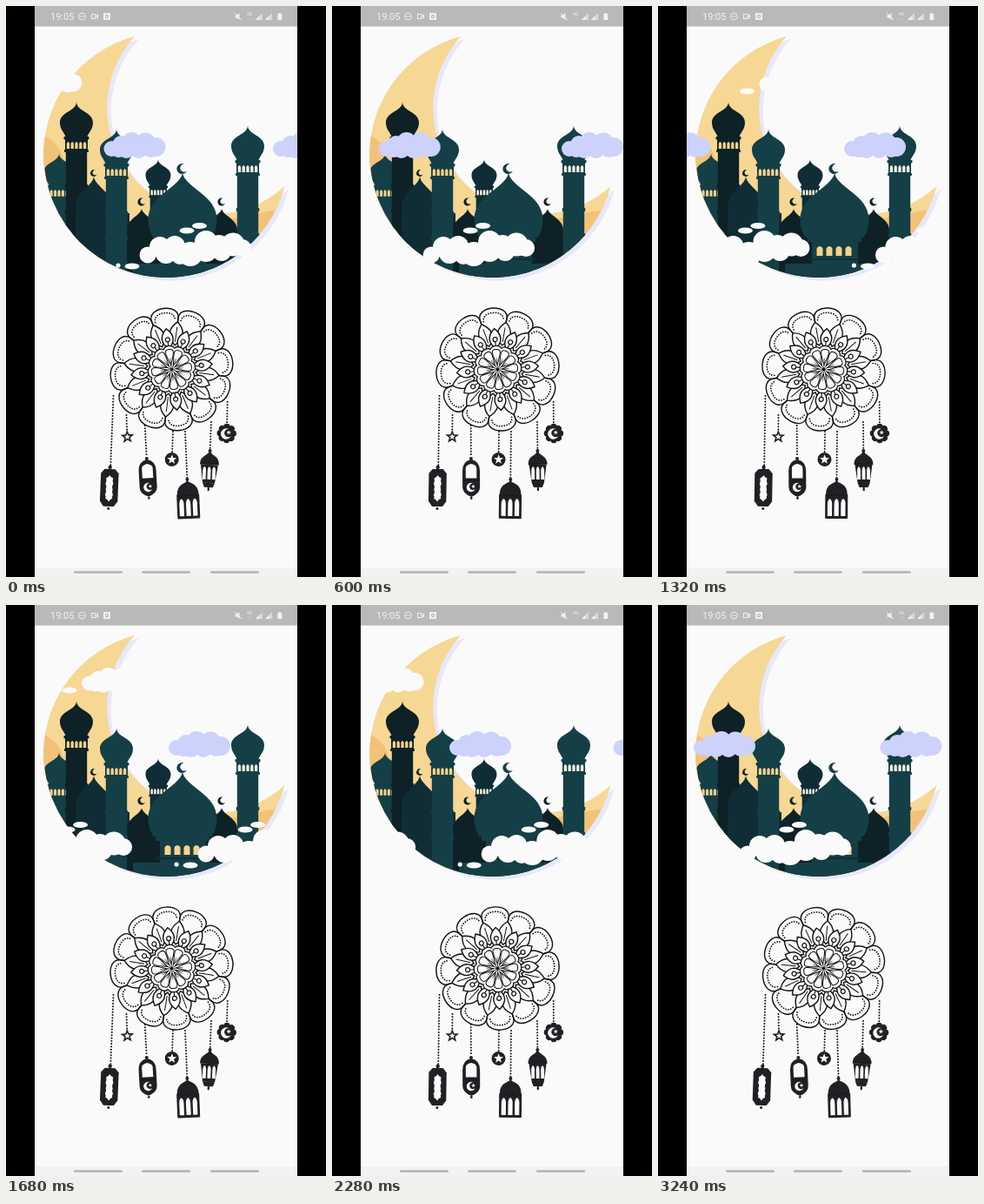
An HTML page that plays this animation: 368x656 px, repeating every 3360 ms.

```html
<!DOCTYPE html>
<html lang="en">
<head>
<meta charset="utf-8">
<title>Crescent and lanterns</title>
<style>
html, body { margin: 0; width: 100%; height: 100%; overflow: hidden; background: #000; }
svg { display: block; width: 368px; height: 656px; }
text { font-family: Roboto, sans-serif; fill: #f1f1f1; }
</style>
</head>
<body>
<svg id="stage" viewBox="0 0 368 656"></svg>
<script>
const BG = '#fafafa', DARK = '#0d2126', NAVY = '#102d36', TEAL = '#153f46', GOLD = '#f7d18b', INK = '#202124';
const MOON = 'M148 34.8A141 141 0 1 0 320.5 207A122 122 0 0 1 148 34.8Z';

const path = (d, fill, extra = '') => `<path d="${d}" fill="${fill}" ${extra}/>`;
const rect = (x, y, w, h, fill, r = 0) => `<rect x="${x}" y="${y}" width="${w}" height="${h}" rx="${r}" fill="${fill}"/>`;
const disc = (x, y, r, fill, ry = r) => `<ellipse cx="${x}" cy="${y}" rx="${r}" ry="${ry}" fill="${fill}"/>`;
const line = (d, width, extra = '', fill = 'none') => path(d, fill, `stroke="#111" stroke-width="${width}" ${extra}`);
const dots = (d, gap, width) => line(d, width, `stroke-linecap="round" stroke-dasharray="0 ${gap}"`);
const around = (n, offset, art) => Array.from({ length: n }, (_, i) =>
  `<g transform="rotate(${(i + offset) * 360 / n})">${art}</g>`).join('');
const arch = (x, y, w, h, fill) =>
  path(`M${x - w / 2} ${y + h}v${-h * .7}q0 ${-h * .22} ${w / 2} ${-h * .3}q${w / 2} ${h * .08} ${w / 2} ${h * .3}v${h * .7}z`, fill);

function crescent(x, y, r, fill) {
  const a = `${x + .4 * r} ${y - .9 * r}`, b = `${x + .9 * r} ${y + .4 * r}`;
  return path(`M${a}A${r} ${r} 0 1 0 ${b}A${.75 * r} ${.75 * r} 0 1 1 ${a}`, fill);
}

function star(x, y, r, fill) {
  const points = Array.from({ length: 10 }, (_, i) => {
    const a = i * Math.PI / 5, q = i % 2 ? r * .42 : r;
    return `${x + q * Math.sin(a)},${y - q * Math.cos(a)}`;
  });
  return `<polygon points="${points.join(' ')}" fill="${fill}"/>`;
}

// Pointed dome: tip at (x, y), half width w, height h
const dome = (x, y, w, h, fill) => path(
  `M${x} ${y}C${x - w * .1} ${y + h * .24} ${x - w} ${y + h * .34} ${x - w} ${y + h * .72}` +
  `Q${x - w} ${y + h * .88} ${x - w * .85} ${y + h}H${x + w * .85}Q${x + w} ${y + h * .88} ${x + w} ${y + h * .72}` +
  `C${x + w} ${y + h * .34} ${x + w * .1} ${y + h * .24} ${x} ${y}`, fill);

function tower(x, y, w, bottom, fill, light) {
  const s = w / 19, h = 41 * s;
  const bar = (half, from, to) => rect(x - half * s, y + from * s, 2 * half * s, (to - from) * s, fill, s);
  let art = path(
    `M${x} ${y}C${x} ${y + h * .27} ${x - w} ${y + h * .28} ${x - w} ${y + h * .58}` +
    `C${x - w} ${y + h * .8} ${x - w * .7} ${y + h * .86} ${x - w * .65} ${y + h}H${x + w * .65}` +
    `C${x + w * .7} ${y + h * .86} ${x + w} ${y + h * .8} ${x + w} ${y + h * .58}` +
    `C${x + w} ${y + h * .28} ${x} ${y + h * .27} ${x} ${y}`, fill);
  art += bar(14.5, 40, 43.5) + bar(13, 42, 58) + bar(14, 55, 58) + bar(13.3, 95, 99) + bar(13.3, 124, 128);
  art += rect(x - 12.2 * s, y + 56 * s, 24.4 * s, bottom - y - 56 * s, fill);
  for (let i = -2; i < 3; i++) art += arch(x + i * 4.8 * s, y + 46 * s, 3.3 * s, 8 * s, light);
  return art;
}

function city() {
  return rect(76, 238, 66, 80, NAVY) + crescent(101, 192, 3.8, DARK) +
    tower(61, 169, 17.5, 320, TEAL, GOLD) + tower(81, 110, 19, 320, DARK, GOLD) +
    rect(80, 240, 40, 80, NAVY) + dome(101, 196, 21, 50, NAVY) +
    tower(175, 176, 14.5, 260, NAVY, '#f3efe0') +
    dome(156, 233, 17, 34, DARK) + rect(138, 258, 60, 60, DARK) + crescent(156, 225, 4.5, DARK) +
    dome(248, 233, 18, 34, DARK) + rect(216, 258, 52, 60, DARK) + crescent(248, 225, 4.5, DARK) +
    tower(127, 141, 19, 320, TEAL, GOLD) + tower(278, 137, 19, 320, TEAL, '#f3efe0') +
    crescent(202.5, 187, 6, TEAL) + dome(203, 192, 39.5, 74, TEAL) +
    rect(172, 266, 62, 5, TEAL, 1) + rect(177, 269, 53, 50, TEAL) +
    [186, 197, 208, 219].map(x => arch(x, 276, 7, 11, GOLD)).join('') +
    rect(146, 296, 116, 20, TEAL) + rect(172, 290, 62, 2, NAVY);
}

function mandala() {
  const bump = 'M-11.1 -41.5L-15.2 -56.500C-18 -66 -9 -70.700 0 -70.700S18 -66 15.2 -56.500L11.1 -41.500';
  return around(12, 0, line(bump, 1.4) + dots('M-11.500 -56C-12 -63 -6 -65.300 0 -65.300S12 -63 11.500 -56', 2.9, 1.8)) +
    around(12, .5, line('M0 -55C-9 -47 -11 -38 0 -28C11 -38 9 -47 0 -55Z', 1.4, '', BG) + line('M0 -32V-49', 1)) +
    around(12, 0, line('M0 -47C-9 -39 -8 -31 0 -24C8 -31 9 -39 0 -47Z', 1.4, '', BG) +
      line('M0 -26V-32', 1.1) + line('M-2.500 -34.500a2.500 2.500 0 1 0 5 0a2.500 2.500 0 1 0 -5 0', 1.2, '', BG)) +
    disc(0, 0, 25, BG) +
    around(12, 0, line('M-6.3 -23.500C-5 -28.500 5 -28.500 6.3 -23.500', 1.3, '', BG)) +
    around(12, 0, line('M0 -5C-1.500 -10 -5 -17 -4.500 -20.500C-4 -24 4 -24 4.500 -20.500C5 -17 1.500 -10 0 -5Z', 1) +
      line('M0 0V-13', .6)) + disc(0, 0, 1.6, '#111');
}

// Each ornament: pivot, swing angle as base + gain * swing, string end, art
const ornaments = [
  { x: 123.5, y: 448, base: 1.2, gain: -1.2, end: 528, art:
    disc(123, 530, 2.2, INK) +
    path('M117 532H129L133.2 537V569L129 575H117L112.8 569V537Z', INK) + disc(123, 577.5, 1.5, INK) +
    path('M123 539q1.5 3 4 3.500q-1 4 .5 6.500q-2 3 -.5 6.500q-1.500 3 .5 6q-1.500 3 -.5 4.500q-2.500 .5 -4 3.500q-1.500 -3 -4 -3.500q1 -1.500 -.5 -4.500q2 -3 .5 -6q1.500 -3.500 -.5 -6.500q1.500 -2.500 .5 -6.500q2.500 -.5 4 -3.500z', BG) },
  { x: 159.7, y: 482, base: -1, gain: 2.4, end: 518, art:
    disc(159.7, 520, 2, INK) + path('M149.700 534Q149.700 523 159.700 521Q169.700 523 169.700 534V553Q169.700 560 159.700 564Q149.700 560 149.700 553Z', INK) +
    arch(159.7, 526, 12.5, 16.5, BG) + dots('M152 545H169', 2.6, 1.4) +
    crescent(159.5, 553, 5.2, BG) + star(162, 552, 2.5, BG) + disc(159.7, 565.5, 1.4, INK) },
  { x: 206, y: 489, base: 0, gain: 2.7, end: 542, art:
    disc(206, 544, 2, INK) + path('M206 545Q207 547 211 548.500Q218.500 552 218.500 562H193.500Q193.500 552 201 548.500Q205 547 206 545Z', INK) +
    rect(193, 561, 26, 28, INK, 1) + dots('M195 562.500H218', 2.6, 1.3) +
    [198.3, 206, 213.7].map(x => arch(x, 566, 5.2, 20, BG)).join('') },
  { x: 236, y: 478, base: 0, gain: -2.6, end: 509, art:
    disc(236, 511, 2, INK) + path('M236 511Q238 515 242 517Q247 520 247 527H225Q225 520 230 517Q234 515 236 511Z', INK) +
    dots('M227 525.500H246', 2.5, 1.2) + path('M226 527H246L243 548H229Z', INK) +
    [230.5, 236, 241.5].map(x => arch(x, 529, 3.8, 15, BG)).join('') +
    path('M229 548H243L241 553H231Z', INK) + disc(236, 555, 1.2, INK, 2.5) },
  { x: 138.5, y: 470, base: 0, gain: 2.5, end: 487, art: star(138.5, 495, 8.3, INK) + star(138.5, 495, 3.8, BG) },
  { x: 254.7, y: 455, base: 0, gain: -1.6, end: 480, art:
    `<g transform="translate(254.7 491)">${around(8, 0, disc(0, -7.5, 3.7, INK))}${disc(0, 0, 8, INK)}</g>` +
    crescent(254.3, 491.5, 6.2, BG) + star(257, 490, 2.8, BG) },
  { x: 192, y: 489, base: 1.1, gain: -1.2, end: 513, art: disc(192, 521, 8, INK) + star(192, 521, 5.8, BG) }
];

const puffs = (list, fill) => list.map(([x, y, r]) => disc(x, y, r, fill)).join('');
const smallCloud = fill => puffs([[9, 19, 9], [20, 14, 10], [32, 11, 11], [48, 12, 11.5], [60, 17, 11],
  [26, 20, 10], [40, 20, 10], [54, 20, 9], [17, 21, 8]], fill);
// x is measured from the centre of the lower floating wisp
const wisp = (x, y) => disc(x, y, 8.5, BG, 3.6);
const whiteGroup = wisp(0, 258) + wisp(14.5, 252.5) + wisp(-63, 299) + wisp(2, 98) + disc(-79, 298, 2.6, BG) +
  puffs([[-45, 286, 9.5], [-31, 277, 12], [-14, 276, 12], [4, 285, 14], [22, 271, 13], [37, 274, 11],
    [53, 274, 13.5], [64, 278, 10], [-24, 284, 12], [-8, 287, 10], [22, 281, 13], [40, 282, 11]], BG) +
  `<g transform="translate(16 72) scale(.95)">${smallCloud(BG)}</g>`;

const pills = [78, 156, 235].map(x => rect(x, 649.3, 56, 2.4, '#b3b3b3', 1.2)).join('');
const statusBar = rect(33, 0, 302, 23.5, '#b9b9b9') +
  `<text x="51" y="16" font-size="11">19:05</text>
   <g fill="none" stroke="#f1f1f1"><circle cx="87.5" cy="12" r="3.9"/><path d="M85.5 12h4"/>
   <rect x="98.5" y="9.5" width="4.5" height="5"/><path d="M103 12l2.5 -2v4z"/></g>` +
  rect(112, 8, 8, 8, '#f1f1f1', 1) + disc(116, 12, 2.2, '#b9b9b9') + disc(116, 12, 1, '#f1f1f1') +
  path('M263.5 10.5h2l3 -2.5v8l-3 -2.5h-2z', '#f1f1f1') +
  `<path d="M263 8l8 8" stroke="#f1f1f1"/><text x="277" y="11" font-size="5">4G</text><text x="278" y="16" font-size="4">↓↑</text>` +
  [287, 298].map(x => path(`M${x} 16l8 -8v8z`, '#d9d9d9') + path(`M${x} 16l4.5 -4.5v4.5z`, '#f1f1f1')).join('') +
  rect(312.3, 9, 5, 7, '#f1f1f1', .8) + rect(313.7, 8, 2.2, 2, '#f1f1f1');

const group = (cls, art, n) => Array.from({ length: n }, () => `<g class="${cls}">${art}</g>`).join('');
const stage = document.getElementById('stage');
stage.innerHTML = `
  <defs>
    <clipPath id="screen"><rect x="33" width="302" height="656"/></clipPath>
    <clipPath id="disc"><circle cx="184.5" cy="171" r="141"/></clipPath>
    <clipPath id="moon"><path d="${MOON}"/></clipPath>
  </defs>
  <g clip-path="url(#screen)">
    ${rect(33, 0, 302, 656, BG)}
    ${path(MOON, '#e7e8fb', 'transform="translate(4.5 3.5)"')}
    ${path(MOON, '#f7d794')}
    <g clip-path="url(#moon)">${path('M40 148Q58 152 66 175L80 320H340V232Q318 233 300 236T250 246L140 300L66 175L40 200Z', '#f3c279')}</g>
    <g clip-path="url(#disc)">${city()}</g>
    ${group('white', whiteGroup, 3)}
    ${group('lilac', smallCloud('#cdd2fc'), 3)}
    <g id="mandala">${mandala()}</g>
    ${ornaments.map(o => group('hung', dots(`M${o.x} ${o.y}V${o.end}`, 3.3, 2) + o.art, 1)).join('')}
    ${statusBar}
    ${rect(33, 645, 302, 11, '#f2f2f2')}${pills}
  </g>`;

const LOOP = 3360, STEP = 120, PERIOD = 2510;
const whites = stage.querySelectorAll('.white'), lilacs = stage.querySelectorAll('.lilac');
const hung = stage.querySelectorAll('.hung'), wheel = document.getElementById('mandala');
const track = [[-250, 325], [0, 307], [600, 264], [1080, 232], [1680, 187], [2280, 135], [2760, 88], [3240, 41], [3605, 9]];

function drift(t) {
  let i = 1;
  while (i < track.length - 1 && t > track[i][0]) i++;
  const [t0, x0] = track[i - 1], [t1, x1] = track[i];
  return x0 + (x1 - x0) * (t - t0) / (t1 - t0);
}

function draw(now) {
  const t = Math.floor(now % LOOP / STEP) * STEP;
  const swing = Math.cos(2 * Math.PI * (t - 950) / 1690);
  wheel.setAttribute('transform', `translate(190.5 417.5) rotate(${-7.7 + .0548 * t})`);
  ornaments.forEach((o, i) => hung[i].setAttribute('transform', `rotate(${o.base + o.gain * swing} ${o.x} ${o.y})`));
  for (let i = 0; i < 3; i++) {
    const k = i - 1;
    whites[i].setAttribute('transform', `translate(${208 - .0815 * t - 204 * k} 0)`);
    lilacs[i].setAttribute('transform', `translate(${drift(t + PERIOD * k)} 145)`);
  }
}

const start = performance.now();
function tick() {
  draw(performance.now() - start);
  requestAnimationFrame(tick);
}
tick();
</script>
</body>
</html>
```
